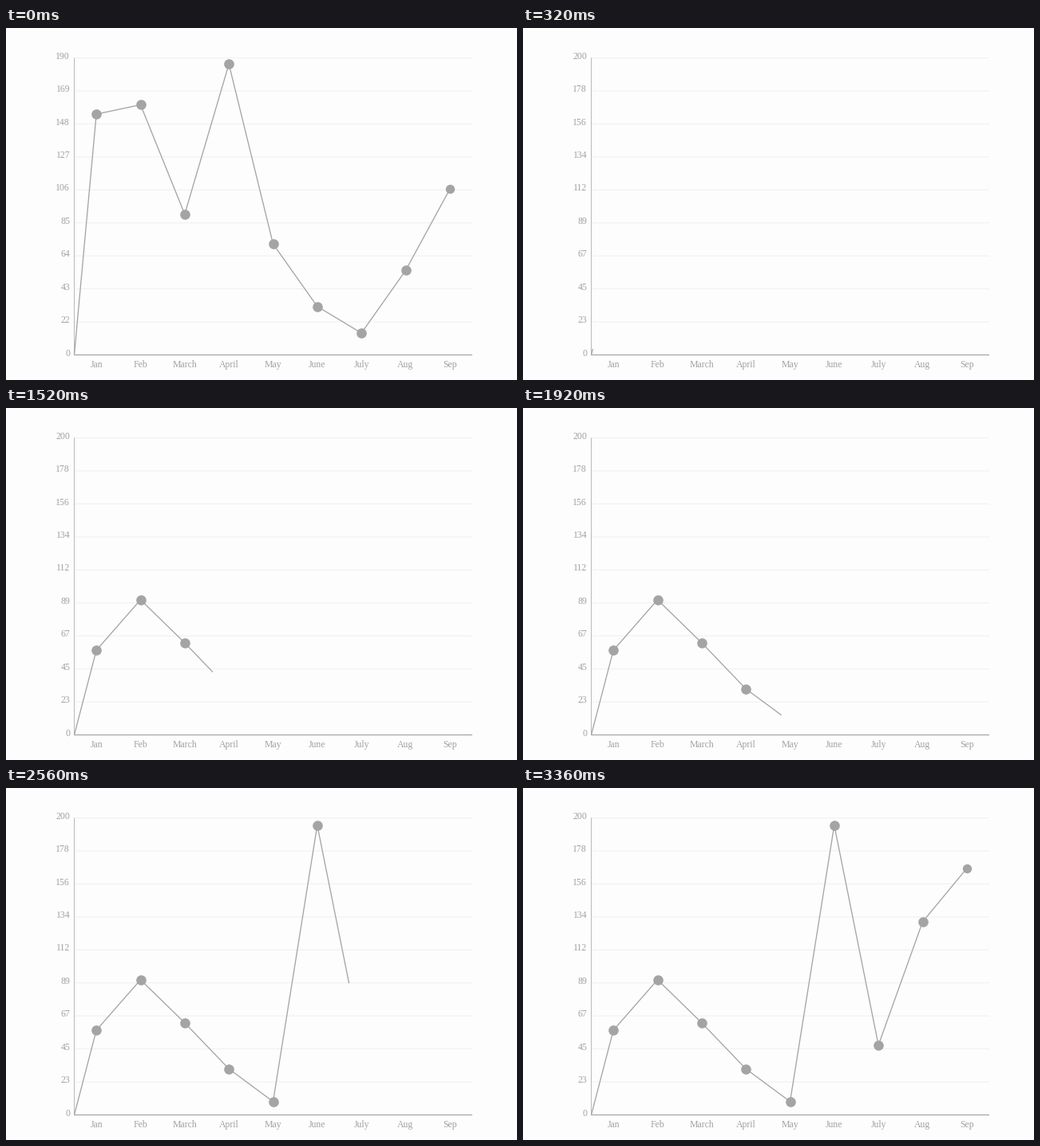
Animation of 640 by 442 pixels, one loop 3760 ms. Source, as a matplotlib script:

```python
import numpy as np
import matplotlib.pyplot as plt
from matplotlib.animation import FuncAnimation

W, H, DPI = 640, 442, 100
STEP, LOOP = 80, 3760
LEFT, RIGHT, TOP, BASE = 85.5, 583.5, 37.5, 410.5
ROWS = 9
GRAY, TEXT, BG = "#a4a4a4", "#a2a2a2", "#fdfdfd"

MONTHS = ["Jan", "Feb", "March", "April", "May", "June", "July", "Aug", "Sep"]
OLD = [154, 160, 90, 186, 71, 31, 14, 54, 106]
NEW = [57, 91, 62, 31, 9, 195, 47, 130, 166]
OLD_MAX, NEW_MAX = 190, 200

# The pen runs at a nearly even pace: 0 is the origin, 1 the first dot.
PEN_TIME, PEN_POS = [297, 960, 2330, 3290], [0, 2, 6, 9]

COUNT = len(MONTHS)
dot_x = LEFT + (RIGHT - LEFT) / COUNT * (np.arange(COUNT) + 0.5)
row_y = np.linspace(BASE, TOP, ROWS + 1)

fig = plt.figure(figsize=(W / DPI, H / DPI), dpi=DPI, facecolor=BG)
ax = fig.add_axes([0, 0, 1, 1])
ax.set_xlim(0, W)
ax.set_ylim(H, 0)
ax.axis("off")


def px(n):
    return n * 72 / DPI


def rule(xs, ys, color, width=1.0, z=1):
    return ax.plot(xs, ys, color=color, lw=px(width), zorder=z, snap=False,
                   solid_capstyle="butt", solid_joinstyle="round")[0]


def label(x, y, text, align):
    return ax.text(x, y, text, ha=align, va="baseline", color=TEXT,
                   family="Liberation Serif", size=px(11.7))


def dot(size):
    return ax.plot([], [], "o", color=GRAY, mew=0, ms=px(size), zorder=4,
                   snap=False)[0]


grid = [rule([LEFT, RIGHT + 0.5], [y, y], "#f0f0f0") for y in row_y[1:]]
axes = [rule([LEFT, LEFT], [TOP, BASE], "#bababa", z=2),
        rule([LEFT, RIGHT + 0.5], [BASE, BASE], "#a4a4a4", 1.2, 2)]
names = [label(x, 426, m, "center") for x, m in zip(dot_x, MONTHS)]
scale = [label(80.2, y + 1.2, "", "right") for y in row_y]
line = rule([], [], GRAY, 1.3, 3)
dots = [dot(12.6) for _ in MONTHS[:-1]] + [dot(11.4)]
parts = grid + axes + names + scale + dots + [line]


def show_chart(values, top, pos):
    for k, text in enumerate(scale):
        text.set_text(str(-(-top * k // ROWS)))
    xs = np.r_[LEFT, dot_x]
    ys = BASE - np.r_[0, values] / top * (BASE - TOP)
    steps = np.arange(COUNT + 1)
    path = np.r_[steps[steps < pos], pos]
    line.set_data(np.interp(path, steps, xs), np.interp(path, steps, ys))
    for k, mark in enumerate(dots, 1):
        mark.set_data([xs[k]], [ys[k]])
        mark.set_visible(pos >= k)


def draw(i):
    t = i * STEP
    blank = STEP <= t < 320
    for part in parts:
        part.set_visible(not blank)
    if t < STEP:
        show_chart(OLD, OLD_MAX, COUNT)
    elif not blank:
        show_chart(NEW, NEW_MAX, np.interp(t, PEN_TIME, PEN_POS))
    return parts


anim = FuncAnimation(fig, draw, frames=LOOP // STEP, interval=STEP,
                     init_func=lambda: draw(0), repeat=True, repeat_delay=0)
plt.show()
```
